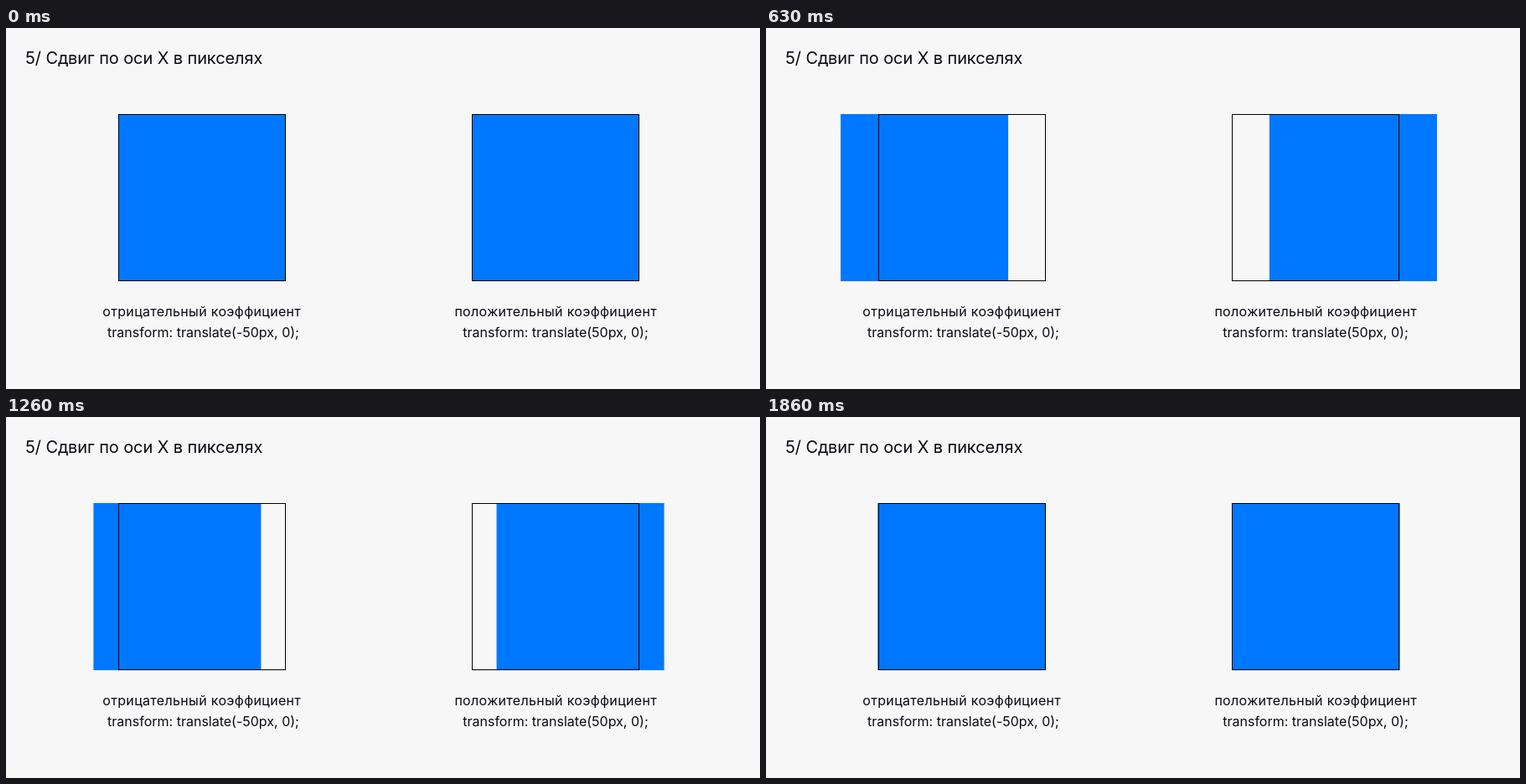
An HTML page with a canvas that plays this animation: 900x432 px, repeating every 1.89 s.

```html
<!DOCTYPE html>
<html lang="ru">
<head>
<meta charset="utf-8">
<title>Сдвиг по оси X</title>
<style>
  html, body { margin: 0; width: 100%; height: 100%; overflow: hidden; background: #f7f7f7; }
  canvas, svg { position: absolute; left: 0; top: 0; display: block; }
  text { font: 16px Inter, Roboto, sans-serif; fill: #090a14; }
  .title { font-size: 20px; letter-spacing: -0.1px; }
  .note { text-anchor: middle; }
  .label { letter-spacing: 0.33px; }
</style>
</head>
<body>
<canvas id="stage" width="900" height="432"></canvas>
<svg width="900" height="432" viewBox="0 0 900 432">
  <text class="title" x="23" y="43">5/ Сдвиг по оси X в пикселях</text>
  <text class="note label" x="233.7" y="345">отрицательный коэффициент</text>
  <text class="note" x="235.5" y="370">transform: translate(-50px, 0);</text>
  <text class="note label" x="656.2" y="345">положительный коэффициент</text>
  <text class="note" x="656" y="370">transform: translate(50px, 0);</text>
</svg>
<script>
const ctx = document.getElementById('stage').getContext('2d');
const LOOP = 1890, STEP = 30, LAG = 10, HALF = 1000;
const SHIFT = 50, SIZE = 200, TOP = 103;

// Cubic curve (.25, .1) (.25, 1), solved by bisection.
function ease(x) {
  const bez = (s, a, b) => 3 * (1 - s) * (1 - s) * s * a + 3 * (1 - s) * s * s * b + s * s * s;
  let lo = 0, hi = 1;
  for (let i = 0; i < 30; i++) {
    const mid = (lo + hi) / 2;
    if (bez(mid, 0.25, 0.25) < x) lo = mid; else hi = mid;
  }
  return bez(lo, 0.1, 1);
}

function offset(t) {
  const p = Math.max(0, t - LAG) / HALF;
  return SHIFT * (p < 1 ? ease(p) : 1 - ease(p - 1));
}

function drawBox(x, dx) {
  ctx.fillStyle = '#0077ff';
  ctx.fillRect(x + dx, TOP, SIZE, SIZE);
  ctx.strokeStyle = '#000';
  ctx.lineWidth = 1;
  ctx.strokeRect(x + 0.5, TOP + 0.5, SIZE - 1, SIZE - 1);
}

function draw(now) {
  const t = Math.floor((now % LOOP) / STEP) * STEP;
  const dx = offset(t);
  ctx.fillStyle = '#f7f7f7';
  ctx.fillRect(0, 0, 900, 432);
  drawBox(134, -dx);
  drawBox(556, dx);
}

const start = performance.now();
function tick(now) {
  draw(Math.max(0, now - start));
  requestAnimationFrame(tick);
}
draw(0);
requestAnimationFrame(tick);
</script>
</body>
</html>
```
